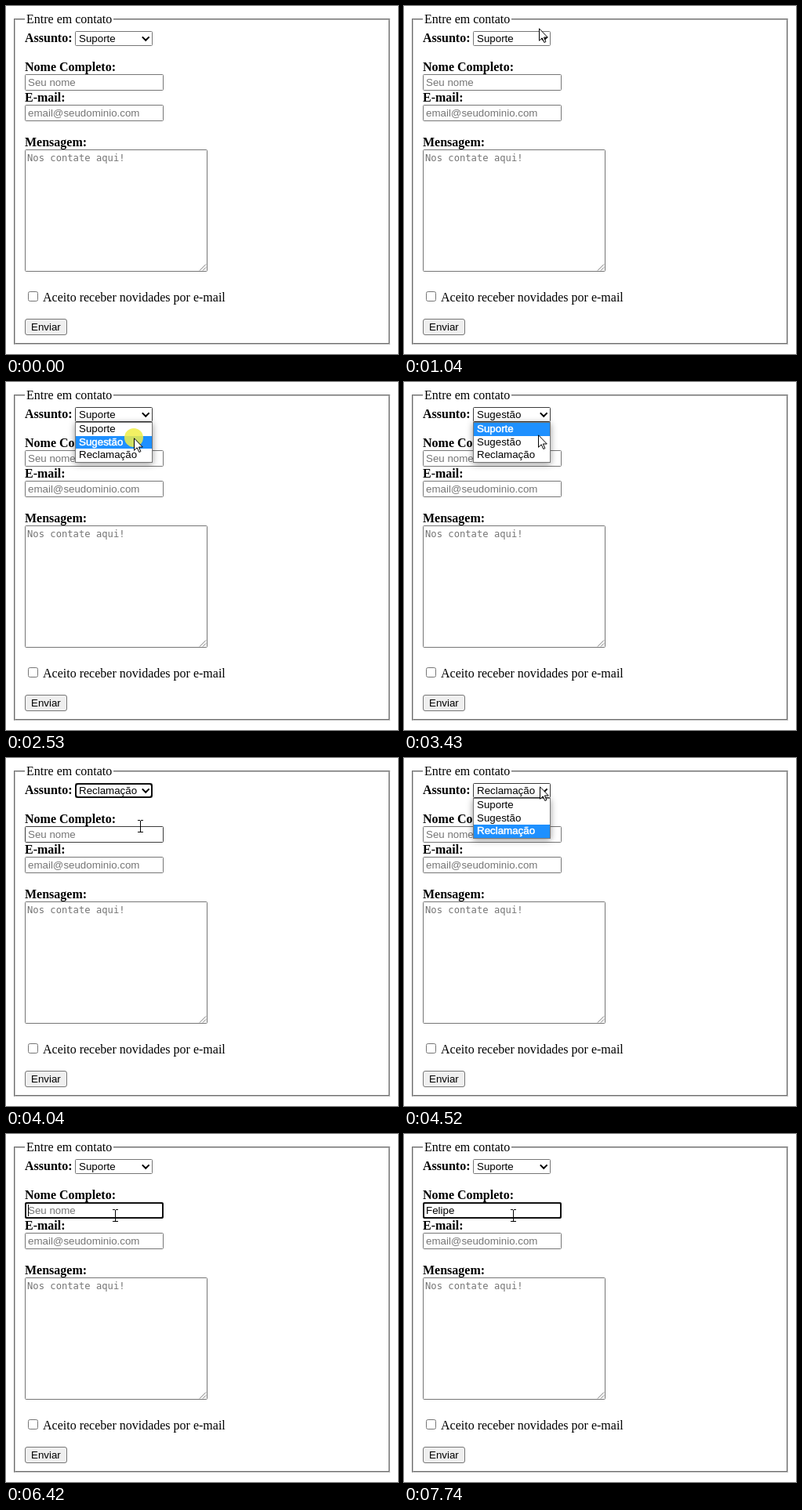
Animation of 500x444 px, one loop 8000 ms. Source, as an HTML page:

```html
<!DOCTYPE html>
<html lang="pt">
<head>
<meta charset="utf-8">
<title>Entre em contato</title>
<style>
html, body { margin: 0; height: 100%; overflow: hidden; background: #fff; }
.frame { position: absolute; left: 10px; top: 16px; width: 480px; height: 416px; box-sizing: border-box; border: 2px groove rgb(192,192,192); }
svg { position: absolute; left: 0; top: 0; }
text { font: 13.333px "Liberation Sans", Arial, sans-serif; }
.serif { font: 16px "Liberation Serif", "Times New Roman", serif; }
.bold { font-weight: bold; }
.hint { fill: #757575; }
.mono { font: 12.18px "DejaVu Sans Mono", monospace; }
.box { fill: #fff; stroke: #767676; }
.box.hover { stroke: #3c3c3c; }
.ring { fill: none; stroke: #101010; stroke-width: 2; }
.line { fill: none; stroke: #000; }
.list { filter: drop-shadow(0 2px 4px rgba(0,0,0,.4)); }
.picked { fill: #fff; stroke: #fff; stroke-width: .5; }
</style>
</head>
<body>
<div class="frame"></div>
<svg width="500" height="444">
  <rect x="24" y="8" width="113" height="18" fill="#fff"/>
  <text class="serif" x="26" y="22">Entre em contato</text>

  <text class="serif bold" x="24" y="46">Assunto:</text>
  <rect id="select" class="box" x="88.5" y="32.5" width="98" height="18" rx="1"/>
  <text id="value" x="93" y="46"></text>
  <path class="line" stroke-width="2" d="M173.8 39.4l4.4 4.4 4.4-4.4"/>
  <rect id="selectRing" class="ring" x="89" y="33" width="97" height="17" rx="3"/>

  <text class="serif bold" x="24" y="83">Nome Completo:</text>
  <rect id="name" class="box" x="24.5" y="87.5" width="176" height="20" rx="1"/>
  <text id="nameHint" class="hint" x="28" y="102">Seu nome</text>
  <text id="typed" x="28" y="102"></text>
  <rect id="caret" y="90" width="1" height="15"/>
  <rect id="nameRing" class="ring" x="25" y="88" width="175" height="19" rx="2"/>

  <text class="serif bold" x="24" y="122">E-mail:</text>
  <rect id="email" class="box" x="24.5" y="126.5" width="176" height="20" rx="1"/>
  <text class="hint" x="28" y="141">email@seudominio.com</text>

  <text class="serif bold" x="24" y="179">Mensagem:</text>
  <rect id="message" class="box" x="24.5" y="183.5" width="232" height="155" rx="1"/>
  <text class="hint mono" x="27" y="198">Nos contate aqui!</text>
  <path d="M247 337.5l8-8M251 337.5l4-4" stroke="#777" fill="none"/>

  <rect class="box" x="28.5" y="364.5" width="12" height="12" rx="2"/>
  <text class="serif" x="47" y="377">Aceito receber novidades por e-mail</text>
  <rect x="24.5" y="399.5" width="53" height="20" rx="2.5" fill="#efefef" stroke="#767676"/>
  <text x="32" y="414">Enviar</text>

  <g id="list">
    <rect class="box list" x="88.5" y="51.5" width="98" height="51"/>
    <rect id="mark" x="89" width="97" fill="#1e90ff"/>
    <text class="option" x="93" y="64">Suporte</text>
    <text class="option" x="93" y="81">Sugestão</text>
    <text class="option" x="93" y="97">Reclamação</text>
  </g>

  <g id="pointer">
    <circle id="press" r="12" fill="#f0ee48" opacity=".85"/>
    <path id="arrow" fill="#fff" stroke="#000" d="M.5.8V16.3L4.2 12.8L6.8 18.5L8.9 17.6L6.4 12H11.3Z"/>
    <path id="beam" class="line" d="M-3 -7.5h3M1 -7.5h3M.5 -7v15M-3 7.5h3M1 7.5h3"/>
  </g>
</svg>
<script>
const LOOP = 8000, STEP = 70, BLINK = 510, FOCUS = 5400;
const $ = id => document.getElementById(id);
const show = (id, on) => $(id).setAttribute('visibility', on ? 'visible' : 'hidden');

const options = [...document.querySelectorAll('.option')];
const rowTop = i => Math.round(52 + i * 50 / 3);
const word = 'Felipe';
const keyTime = i => 6530 + 110 * i + (i > 2 ? 150 : 0);

// Pointer moves: start, end, destination
const enter = { time: 280, x: 338, y: 426 };
const moves = [
  [enter.time, 1040, 172, 28], [1050, 1120, 172, 37], [1700, 2130, 163, 71],
  [2730, 3080, 172, 43], [3290, 3570, 170, 90], [3910, 4040, 171, 87],
  [4040, 4270, 173, 36], [4510, 4800, 163, 61], [5000, 5320, 139, 104]
];
// Drop-down: opened, closed, option chosen
const visits = [[1200, 2600, 1], [3120, 3910, 2], [4350, 5000, 0]];
const presses = [1200, 2530, 3120, 3840, 4350, FOCUS];

function pointAt(t) {
  let { x, y } = enter;
  for (const [start, end, toX, toY] of moves) {
    if (t < start) break;
    const k = t >= end ? 1 : Math.floor((t - start) / STEP) * STEP / (end - start);
    const ease = k * k * (3 - 2 * k);
    x += (toX - x) * ease;
    y += (toY - y) * ease;
  }
  return [Math.round(x), Math.round(y)];
}

function hit(id, x, y) {
  const r = $(id).getBBox();
  return x >= r.x - 1 && x <= r.x + r.width && y >= r.y - 1 && y <= r.y + r.height;
}

function drawSelect(t, y, open) {
  const done = visits.filter(v => t >= v[1]);
  const chosen = done.length ? done.pop()[2] : 0;
  const row = y > 51 ? Math.min(2, Math.floor((y - 52) * 3 / 50)) : chosen;
  $('value').textContent = options[chosen].textContent;
  $('mark').setAttribute('y', rowTop(row));
  $('mark').setAttribute('height', rowTop(row + 1) - rowTop(row));
  options.forEach((o, i) => o.classList.toggle('picked', i === row));
  show('list', open);
  show('selectRing', !open && t >= visits[0][1] && t < FOCUS);
}

function drawPointer(t, x, y, open) {
  const visible = t >= enter.time;
  let beam = false;
  for (const id of ['select', 'name', 'email', 'message']) {
    const over = visible && !open && hit(id, x, y);
    $(id).classList.toggle('hover', over || (open && id === 'select'));
    beam ||= over && id !== 'select';
  }
  $('pointer').setAttribute('transform', `translate(${x} ${y})`);
  show('arrow', visible && !beam);
  show('beam', beam);
  show('press', presses.some(p => t >= p && t < p + STEP));
}

function drawName(t) {
  const keys = [...word].map((c, i) => keyTime(i)).filter(k => t >= k);
  const lastInput = keys.length ? keys[keys.length - 1] : FOCUS;
  $('typed').textContent = word.slice(0, keys.length);
  const width = keys.length ? $('typed').getComputedTextLength() : 0;
  $('caret').setAttribute('x', 28 + Math.round(width));
  show('nameHint', !keys.length);
  show('nameRing', t >= FOCUS);
  show('caret', t >= FOCUS && Math.floor((t - lastInput) / BLINK) % 2 === 0);
}

function draw(t) {
  const [x, y] = pointAt(t);
  const open = visits.some(([from, to]) => t >= from && t < to);
  drawSelect(t, y, open);
  drawPointer(t, x, y, open);
  drawName(t);
}

function tick() {
  draw(performance.now() % LOOP);
  requestAnimationFrame(tick);
}
tick();
</script>
</body>
</html>
```
